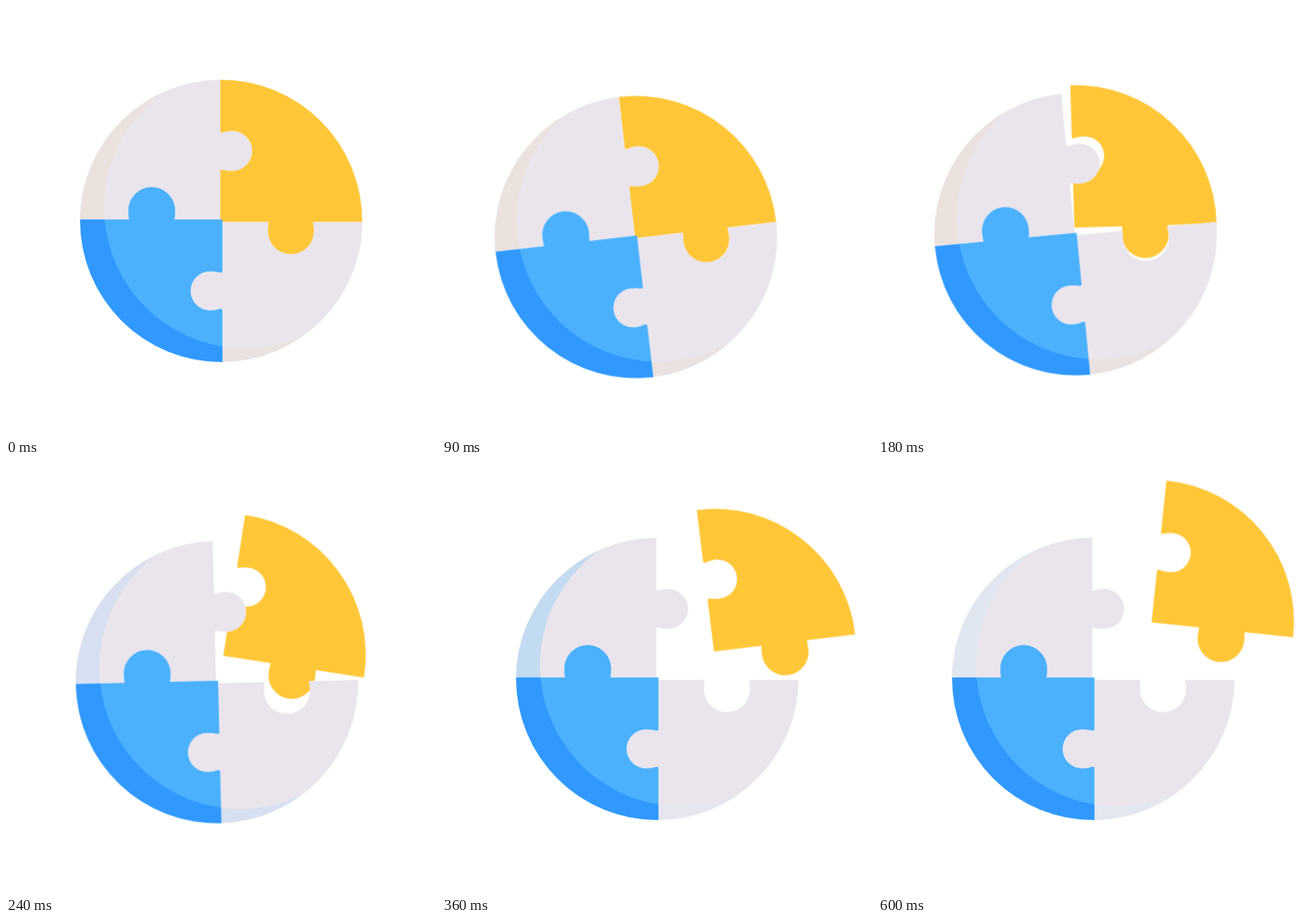
Animation of 500 by 500 pixels, one loop 0.64 s. Source, as an HTML page:

```html
<!DOCTYPE html>
<html lang="en">
<head>
<meta charset="utf-8">
<title>Puzzle disc</title>
<style>
  html, body { margin: 0; width: 100%; height: 100%; overflow: hidden; background: #fff; }
  svg { display: block; width: 100vw; height: 100vh; }
  .piece { stroke-width: .5; }
  .white { fill: #eae5ec; stroke: #eae5ec; }
  .blue { fill: #4bb1fd; stroke: #4bb1fd; }
  .yellow { fill: #ffc738; stroke: #ffc738; }
</style>
</head>
<body>
<svg viewBox="0 0 500 500">
  <defs>
    <path id="plain" d="M249 86V146q0 2 2 1.5Q257 145.5 263 145.5A23 23 0 0 1 263 191.5Q257 191.5 251 190q-2-.5-2 1.5V248.5H195.4Q196 243 196 238A27 27 0 0 0 142 238Q142 243 143.2 248.5H86A164 164 0 0 1 249 86Z"/>
    <path id="tinted" d="M249 86V146q0 2 2 1.5Q257 145.5 263 145.5A23 23 0 0 1 263 191.5Q257 191.5 251 190q-2-.5-2 1.5V251.3H304.8Q304 256 304 262A27 27 0 0 0 358 262Q358 256 357.2 251.3H414A164 164 0 0 0 249 86Z"/>
    <path id="crescent" d="M183 100.3A164 164 0 1 0 345 383.7A164 164 0 0 1 183 100.3Z"/>
    <clipPath id="inTop"><use href="#plain"/></clipPath>
    <clipPath id="inLow"><use href="#plain" transform="rotate(180 250.2 249.9)"/></clipPath>
    <clipPath id="inBlue"><use href="#tinted" transform="rotate(180 250.2 249.9)"/></clipPath>
  </defs>
  <use id="loose" class="piece yellow" href="#tinted"/>
  <g id="body">
    <use class="piece white" href="#plain"/>
    <g clip-path="url(#inTop)"><use id="topShade" href="#crescent"/></g>
    <use class="piece white" href="#plain" transform="rotate(180 250.2 249.9)"/>
    <g clip-path="url(#inLow)"><use id="lowShade" href="#crescent"/></g>
    <use class="piece blue" href="#tinted" transform="rotate(180 250.2 249.9)"/>
    <g clip-path="url(#inBlue)"><use href="#crescent" fill="#3098fe"/></g>
  </g>
</svg>
<script>
const LOOP = 640, STEP = 30, LAST = 600;

const clamp = u => Math.min(1, Math.max(0, u));
const sine = u => (1 - Math.cos(Math.PI * u)) / 2;

// Same curve as cubic-bezier(.28, 0, .33, 1)
function glide(u) {
  let lo = 0, hi = 1;
  for (let i = 0; i < 30; i++) {
    const k = (lo + hi) / 2;
    if (.84 * k * (1 - k) ** 2 + .99 * k * k * (1 - k) + k ** 3 < u) lo = k; else hi = k;
  }
  return lo * lo * (3 - 2 * lo);
}

// Rows of [time, value, easing into it]
function track(rows, t) {
  let [t0, value] = rows[0];
  for (const [t1, v1, ease] of rows.slice(1)) {
    value += (v1 - value) * ease(clamp((t - t0) / (t1 - t0)));
    if (t < t1) break;
    t0 = t1;
  }
  return value;
}

const sway = [[0, 0], [120, 1, sine], [285, 0, sine]];
const tilt = [[130, 0], [250, 10.3, sine], [360, -6.9, sine], [600, 6, glide]];
const leave = [[120, 0], [600, 1, glide]];
const shades = [
  [0, '#ebe2de', '#eae2e1'],
  [210, '#d6e0f0', '#d6e0f0'],
  [300, '#c3dbf0', '#e6e6f0'],
  [570, '#e0e7f1', '#e3e7f0']
];

const move = (x, y) => `translate(${x}px, ${y}px)`;
const turn = (deg, x, y) => `${move(x, y)} rotate(${deg}deg) ${move(-x, -y)}`;

function bodyPose(t) {
  const s = track(sway, t);
  return `${move(-29 * s, 22 * s)} ${turn(-7.7 * s, 250, 250)}`;
}

function loosePose(t) {
  const p = track(leave, t);
  return `${move(77.5 * p, -58.3 * p)} ${bodyPose(t)} ${turn(track(tilt, t), 331, 169)}`;
}

const shade = column => t => shades.filter(row => row[0] <= t).pop()[column];

function play(id, prop, valueAt) {
  const keys = [];
  for (let t = 0; t <= LAST; t += STEP) {
    keys.push({ [prop]: valueAt(t), offset: t / LOOP, easing: 'steps(1, end)' });
  }
  keys.push({ [prop]: valueAt(LAST), offset: 1 });
  document.getElementById(id).animate(keys, { duration: LOOP, iterations: Infinity });
}

play('body', 'transform', bodyPose);
play('loose', 'transform', loosePose);
play('topShade', 'fill', shade(1));
play('lowShade', 'fill', shade(2));
</script>
</body>
</html>
```
